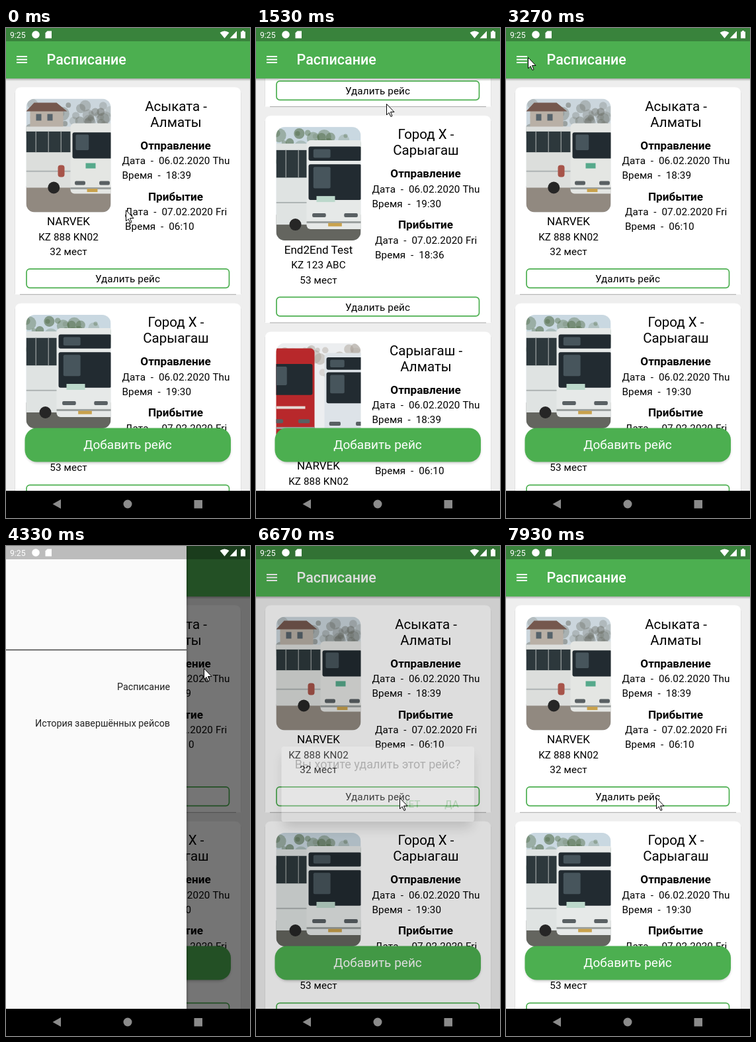
Animation, 369 px wide and 738 px high, one loop 8000 ms. Source, as an HTML page:

```html
<!DOCTYPE html>
<html lang="ru">
<head>
<meta charset="utf-8">
<title>Расписание</title>
<style>
  html, body { margin: 0; width: 100%; height: 100%; overflow: hidden; background: #000; }
  svg { display: block; width: 100%; height: 100%; }
  text { font-family: Roboto, "Noto Sans", sans-serif; fill: #000; white-space: pre; }
  .mid { text-anchor: middle; }
  .route { font-size: 20.5px; }
  .head { font-size: 17.1px; font-weight: 700; }
  .name { font-size: 17.05px; }
  .body { font-size: 15.25px; letter-spacing: .1px; }
  .bar { font-size: 21.5px; font-weight: 500; fill: #fff; }
  .add { font-size: 19px; fill: #fff; }
  .clock { font-size: 12.2px; fill: #fff; }
  .ask { font-size: 18px; fill: #212121; }
  .act { font-size: 15.2px; font-weight: 500; fill: #4caf50; }
  .item { font-size: 14.3px; fill: #212121; text-anchor: end; }
</style>
</head>
<body>
<svg viewBox="0 0 369 738">
  <defs>
    <clipPath id="view"><rect y="76" width="369" height="621"/></clipPath>
    <clipPath id="photo"><rect width="128" height="171" rx="13"/></clipPath>
    <linearGradient id="drop" x2="0" y2="1">
      <stop stop-color="#000" stop-opacity=".28"/><stop offset="1" stop-color="#000" stop-opacity="0"/>
    </linearGradient>
    <filter id="soft" x="-20%" y="-20%" width="140%" height="160%"><feGaussianBlur stdDeviation="2"/></filter>
    <filter id="deep" x="-20%" y="-40%" width="140%" height="200%"><feGaussianBlur stdDeviation="9"/></filter>
  </defs>

  <rect width="369" height="697" fill="#eee"/>
  <g clip-path="url(#view)">
    <g id="list"></g>
    <ellipse id="glowTop" cx="184" cy="76" rx="270" ry="32" fill="#9e9e9e"/>
    <ellipse id="glowEnd" cx="184" cy="697" rx="270" ry="32" fill="#fff"/>
    <rect x="30" y="605" width="309" height="50" rx="18" opacity=".25" filter="url(#soft)"/>
    <rect x="28.5" y="602.5" width="311.5" height="51" rx="18" fill="#4caf50"/>
    <text class="add mid" x="184" y="634">Добавить рейс</text>
  </g>

  <rect y="76" width="369" height="4" fill="url(#drop)"/>
  <rect width="369" height="76" fill="#4caf50"/>
  <path d="M16 43h16M16 47.500h16M16 52h16" stroke="#fff" stroke-width="1.8"/>
  <text class="bar" x="61.5" y="54.8">Расписание</text>

  <rect id="scrim" width="369" height="697"/>
  <g id="drawer">
    <rect x="-273" width="274" height="697" opacity=".3" filter="url(#soft)"/>
    <rect x="-273" width="273" height="697" fill="#fafafa"/>
    <path d="M-273 156.5H0" stroke="#444" stroke-width="1.6"/>
    <text class="item" x="-25" y="217">Расписание</text>
    <text class="item" x="-25" y="272">История завершённых рейсов</text>
  </g>
  <g id="dialog">
    <rect x="42" y="316" width="284" height="108" opacity=".6" filter="url(#deep)"/>
    <rect x="38.5" y="302" width="291.5" height="113" rx="3.6" fill="#fff"/>
    <rect id="press" x="206" y="372" width="56" height="32" rx="3" fill="#4caf50"/>
    <text class="ask mid" x="184" y="335">Вы хотите удалить этот рейс?</text>
    <text class="act mid" x="234" y="393.5">НЕТ</text>
    <text class="act mid" x="296" y="393.5">ДА</text>
  </g>

  <rect width="369" height="20" opacity=".25"/>
  <text class="clock" x="6" y="14.5">9:25</text>
  <g fill="#fff">
    <circle cx="45" cy="10" r="5.8"/>
    <path d="M62.500 4.500H69V15.500H59.500V7.500Z"/>
    <path d="M323.500 7Q330.500 2 337.500 7L330.500 15.500Z"/>
    <path d="M349 4.500V15.500H338.500Z"/>
    <path d="M357 4h3v1.500h2V15.500h-7V5.500H357Z"/>
  </g>

  <rect y="697" width="369" height="41"/>
  <g fill="#8b8b8b">
    <path d="M70.500 717L83 710V724Z"/>
    <circle cx="184" cy="717" r="6.5"/>
    <rect x="284.5" y="711" width="12.5" height="12.5"/>
  </g>
  <path id="cursor" d="M.5 .5V17L4 13.500L7 19.500L9 18.500L6.500 12.500H12Z" fill="#fff" stroke="#000"/>
</svg>

<script>
const $ = id => document.getElementById(id);
const LOOP = 8000, PITCH = 325.5, DRAWER = 273, END = 451;

const rect = (x, y, w, h, fill, rx = 0) =>
  `<rect x="${x}" y="${y}" width="${w}" height="${h}" rx="${rx}" fill="${fill}"/>`;
const label = (cls, x, y, str) => `<text class="${cls}" x="${x}" y="${y}">${str}</text>`;
const repeat = (n, make) => Array.from({ length: n }, (_, i) => make(i)).join("");

function seeded(seed) {
  return () => (seed = seed * 16807 % 2147483647) / 2147483647;
}

// Sky, a band of blurred foliage and the ground.
function backdrop(sky, leaf, ground, seed) {
  const rnd = seeded(seed);
  const leaves = repeat(45, () =>
    `<circle cx="${rnd() * 128}" cy="${8 + rnd() * 50}" r="${3 + rnd() * 8}" fill="${leaf}" opacity="${.15 + rnd() * .4}"/>`);
  return rect(0, 0, 128, 171, sky) + leaves + rect(0, 132, 128, 39, ground);
}

// Bus nose; panes are window bands as fractions of its height.
function front(x, y, w, h, paint, panes) {
  const glass = panes.map(([a, b]) =>
    rect(x + 3, y + a * h, w - 6, (b - a) * h, "#222b31", 3) +
    rect(x + w * .12, y + (a + .03) * h, w * .3, (b - a) * h * .6, "#47555c", 2));
  const lamps = [.1, .66].map(k => rect(x + k * w, y + .82 * h, w * .24, 6, "#596063", 2));
  return rect(x, y, w, h, paint, 6) + glass.join("") + lamps.join("") +
    rect(x, y + .91 * h, w, 3, "#9ba09f") + rect(x + w * .38, y + .93 * h, w * .24, 5, "#c9a24c");
}

// Bus flank with evenly spaced window posts and one wheel.
function side(y, w, h, paint) {
  return rect(0, y, w, h, paint) + rect(0, y + h * .08, w, h * .34, "#2d383c") +
    repeat(3, i => rect(14 + i * 19, y + h * .08, 1.5, h * .34, "#899090")) +
    rect(0, y + h * .72, w, 2, "#aeb4b4") +
    `<circle cx="${w * .58}" cy="${y + h}" r="9" fill="#262626"/>`;
}

const photos = {
  depot: backdrop("#cbd6dd", "#6c7068", "#918980", 7) +
    rect(6, 17, 50, 30, "#b9b0a6") + `<path d="M0 19L12 6H46L62 19Z" fill="#75584e"/>` +
    repeat(2, i => rect(15 + i * 17, 23, 8, 10, "#56636b")) +
    side(42, 72, 92, "#dcdedc") + rect(48, 100, 10, 18, "#a7544a", 4) +
    front(67, 37, 66, 106, "#e4e6e3", [[.13, .5]]) + rect(90, 97, 15, 8, "#56a98b"),
  street: backdrop("#c9d8e1", "#4a653f", "#64655f", 23) +
    side(25, 50, 122, "#dfe3e2") +
    front(46, 20, 86, 134, "#e6e9e8", [[.07, .23], [.27, .67]]) + rect(61, 104, 28, 9, "#bcd8cb"),
  pair: backdrop("#eceef0", "#a59c91", "#7d7975", 41) +
    front(-14, 8, 72, 130, "#b8282b", [[.18, .54]]) + rect(0, 95, 44, 4, "#e4dad5") +
    front(73, 15, 72, 126, "#dde3e8", [[.05, .2], [.23, .6]])
};

const trips = [
  { from: "Асыката", to: "Алматы", out: "18:39", arrive: "06:10", bus: "NARVEK", plate: "KZ 888 KN02", seats: 32, photo: "depot" },
  { from: "Город Х", to: "Сарыагаш", out: "19:30", arrive: "18:36", bus: "End2End Test", plate: "KZ 123 ABC", seats: 53, photo: "street" },
  { from: "Сарыагаш", to: "Алматы", out: "18:39", arrive: "06:10", bus: "NARVEK", plate: "KZ 888 KN02", seats: 32, photo: "pair" }
];

const stop = (title, x, y, date, time) =>
  label("head mid", 256.5, y, title) +
  label("body", x, y + 22.6, "Дата  -  " + date) +
  label("body", x, y + 44.7, "Время  -  " + time);

function card(trip, i) {
  return `<g transform="translate(0 ${i * PITCH - .7})">
    <path d="M14.500 98V400H354.500V98" fill="none" stroke="#000" stroke-opacity=".1" stroke-width="2"/>
    <path d="M14 402V99Q14 90 23 90H346Q355 90 355 99V402Z" fill="#fff"/>
    <path d="M21 402H348" stroke="#a8a8a8"/>
    <g transform="translate(30.5 107.200)" clip-path="url(#photo)">${photos[trip.photo]}</g>
    ${label("route mid", 257, 125.5, trip.from + " -")}
    ${label("route mid", 257, 149.5, trip.to)}
    ${stop("Отправление", 175.5, 183.3, "06.02.2020 Thu", trip.out)}
    ${stop("Прибытие", 180, 260.3, "07.02.2020 Fri", trip.arrive)}
    ${label("name mid", 94.5, 298, trip.bus)}
    ${label("body mid", 94.5, 320.3, trip.plate)}
    ${label("body mid", 94.5, 342.6, trip.seats + " мест")}
    <rect x="31" y="363.5" width="306.5" height="28.5" rx="5" fill="#fff" stroke="#4caf50" stroke-width="1.7"/>
    ${label("body mid", 184, 383.7, "Удалить рейс")}
  </g>`;
}
$("list").innerHTML = trips.map(card).join("");

const ramp = (t, from, span) => Math.min(1, Math.max(0, (t - from) / span));
const settle = (t, from, span) => 1 - (1 - ramp(t, from, span)) ** 2.5;
const pulse = (t, from, span) => Math.sin(Math.PI * ramp(t, from, span));

// The two drags over the list.
const up = { from: 730, to: 1670, y0: 397, y1: 66 };
const down = { from: 1930, to: 2383, y0: 66, y1: 517 };

// Pointer journeys: start, end, destination.
const moves = [
  [400, up.from, 188, up.y0],
  [up.from, up.to, 199, up.y1],
  [down.from, down.to, 190, down.y1],
  [2540, 3270, 32, 42],
  [3730, 4330, 299, 184],
  [4670, 4800, 300.5, 208],
  [5330, 5670, 238, 333],
  [5870, 6130, 217, 379],
  [7240, 7330, 234, 385],
  [7600, 7930, 226.5, 379]
];

function pointer(t) {
  let x = 181, y = 274;
  for (const [from, to, toX, toY] of moves) {
    const k = ramp(t, from, to - from);
    x += (toX - x) * k;
    y += (toY - y) * k;
  }
  return { x, y };
}

// The list follows the pointer, flies on to its end, then is pulled back.
function scroll(t, y) {
  if (t < up.from || t >= down.to) return 0;
  if (t < up.to) return up.y0 - y;
  const thrown = up.y0 - up.y1;
  if (t < down.from) return thrown + (END - thrown) * settle(t, up.to, 200);
  return END - (y - down.y0);
}

const move = (id, x, y) => $(id).setAttribute("transform", `translate(${x} ${y})`);
const fade = (id, value) => $(id).setAttribute("opacity", value);

function draw(now) {
  // The picture advances fifteen times a second.
  const t = Math.floor((now % LOOP) * .015 + .1) / .015;
  const { x, y } = pointer(t);
  const open = settle(t, 3600, 330) - settle(t, 5000, 330);
  const shown = ramp(t, 6600, 270) - ramp(t, 7600, 270);
  move("list", 0, -scroll(t, y));
  move("drawer", open * DRAWER, 0);
  move("cursor", Math.round(x), Math.round(y));
  $("drawer").style.display = open > 0 ? "" : "none";
  fade("scrim", .54 * Math.max(open, shown));
  fade("dialog", shown);
  fade("press", .2 * pulse(t, 7400, 400));
  fade("glowEnd", .3 * pulse(t, 1800, 500));
  fade("glowTop", .2 * pulse(t, down.to, 550));
}

const start = performance.now();
function tick() {
  draw(performance.now() - start);
  requestAnimationFrame(tick);
}
tick();
</script>
</body>
</html>
```
